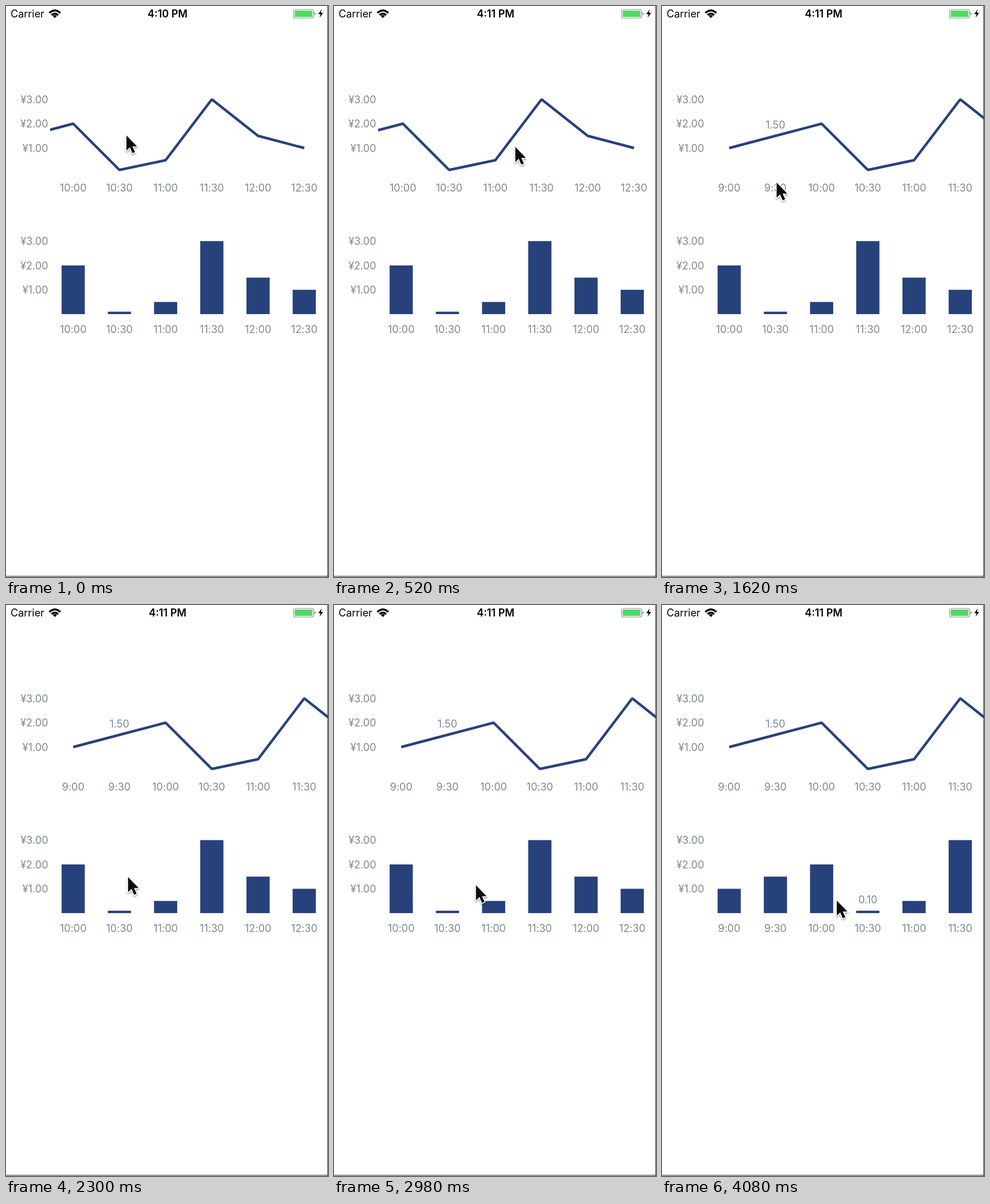
These frames come from a looping animation (562 by 997 pixels, 4.1 s). An HTML page:

```html
<!DOCTYPE html>
<html lang="en">
<head>
<meta charset="utf-8">
<title>Scrolling charts</title>
<style>
  html, body { margin: 0; width: 100%; height: 100%; overflow: hidden; background: #fff; }
  svg { display: block; width: 562px; height: 997px; }
  text { font: 18px Inter, Roboto, sans-serif; }
  .chart text { fill: #7b8991; font-feature-settings: "calt" 0; text-anchor: middle; }
  .chart .axis { text-anchor: end; }
  .line { fill: none; stroke: #27417b; stroke-width: 4.5; stroke-linejoin: bevel; }
  .bar { fill: #27417b; }
  .clock { font-weight: 600; text-anchor: middle; }
</style>
</head>
<body>
<svg viewBox="0 0 562 997">
  <defs>
    <clipPath id="plot"><rect x="77" y="0" width="485" height="997"/></clipPath>
    <filter id="shadow" x="-50%" y="-50%" width="200%" height="200%">
      <feDropShadow dx="0" dy="2" stdDeviation="1.6" flood-opacity=".4"/>
    </filter>
  </defs>

  <text x="8" y="20">Carrier</text>
  <g fill="none" stroke="#000" stroke-width="3.4">
    <path d="M75.8 12.2Q85.3 3.2 94.8 12.2"/>
    <path d="M79.6 16Q85.3 10.8 91 16"/>
  </g>
  <path d="M85.3 21L81.8 17.4Q85.3 14.6 88.8 17.4Z"/>
  <text id="clock" class="clock" x="282" y="20"></text>
  <rect x="502" y="6" width="34.5" height="15" rx="3" fill="#fff" stroke="#8b8b8b" stroke-width="1.2"/>
  <rect x="504" y="8" width="30.5" height="11" rx="1.5" fill="#4cd964"/>
  <path d="M538 11q2.4 .4 2.4 2.5t-2.4 2.5z" fill="#8b8b8b"/>
  <path d="M551 6L545 14.3H549L547.4 20.5L553.6 12H549.6Z"/>

  <g id="charts"></g>

  <path d="M561.5 0V997M0 995.7H562" stroke="#4c4a50" stroke-width="1.2"/>
  <g id="cursor" filter="url(#shadow)">
    <path d="M0 0V26.5L6 20.8L10.5 31L15 29L10.5 19.2H18.6Z" fill="#111"
      stroke="#fff" stroke-width="3" stroke-linejoin="round" paint-order="stroke"/>
  </g>
</svg>
<script>
const LOOP = 4100;
const STEP = 80.65, FIRST = 117.3, UNIT = 42.5, BAR = 40.5;
const SCROLL = 2 * STEP;
const values = [1, 1.5, 2, 0.1, 0.5, 3, 1.5, 1];
const $ = id => document.getElementById(id);

function add(parent, tag, attrs, text = '') {
  const el = document.createElementNS('http://www.w3.org/2000/svg', tag);
  for (const key in attrs) el.setAttribute(key, attrs[key]);
  el.textContent = text;
  return parent.appendChild(el);
}

const pointX = i => FIRST + i * STEP;
const hour = i => `${9 + (i >> 1)}:${i % 2 ? '30' : '00'}`;

// Builds one chart and returns its scrolling layer and value tip.
function chart(base, isLine, tipIndex) {
  const group = add($('charts'), 'g', { class: 'chart' });
  for (let v = 1; v <= 3; v++) {
    add(group, 'text', { class: 'axis', x: 73.5, y: base - v * UNIT + 6.5 }, `¥${v}.00`);
  }
  const plot = add(group, 'g', { 'clip-path': 'url(#plot)' });
  const layer = add(plot, 'g', {});
  const top = i => base - values[i] * UNIT;
  if (isLine) {
    const points = values.map((v, i) => `${pointX(i)},${top(i)}`).join(' ');
    add(layer, 'polyline', { class: 'line', points });
  }
  values.forEach((v, i) => {
    if (!isLine) {
      add(layer, 'rect', {
        class: 'bar', x: pointX(i) - BAR / 2, y: top(i), width: BAR, height: v * UNIT
      });
    }
    add(layer, 'text', { x: pointX(i), y: base + 33 }, hour(i));
  });
  const tip = add(layer, 'text', { x: pointX(tipIndex), y: top(tipIndex) - 13 },
    values[tipIndex].toFixed(2));
  return { layer, tip };
}

const lineChart = chart(290.5, true, 1);
const barChart = chart(538, false, 3);

// Pointer stops: time, x, y
const stops = [
  [0, 210, 226], [520, 316, 246], [740, 404, 252], [900, 398, 256], [1420, 200, 308],
  [1620, 200, 308], [2140, 209, 464], [2300, 213, 475], [2700, 222, 482],
  [2980, 247, 489], [3160, 385, 524], [3240, 385, 530], [3380, 366, 563],
  [3880, 366, 563], [4080, 305, 516], [LOOP, 305, 516]
];

const clamp = p => Math.min(1, Math.max(0, p));
const smooth = p => p * p * (3 - 2 * p);
const progress = (t, from, to) => smooth(clamp((t - from) / (to - from)));

function pointer(t) {
  const k = stops.findIndex(s => s[0] > t);
  const [t0, x0, y0] = stops[k - 1], [t1, x1, y1] = stops[k];
  const p = (t - t0) / (t1 - t0);
  return [x0 + (x1 - x0) * p, y0 + (y1 - y0) * p];
}

function update({ layer, tip }, scroll, tipShown) {
  layer.setAttribute('transform', `translate(${(scroll - 1) * SCROLL} 0)`);
  tip.setAttribute('visibility', tipShown ? 'visible' : 'hidden');
}

function draw(t) {
  $('clock').textContent = t < 260 ? '4:10 PM' : '4:11 PM';
  update(lineChart, progress(t, 500, 760), t >= 1620);
  update(barChart, progress(t, 2980, 3200), t >= 3540);
  $('cursor').setAttribute('transform', `translate(${pointer(t)})`);
}

const start = performance.now();
function tick() {
  draw((performance.now() - start) % LOOP);
  requestAnimationFrame(tick);
}
tick();
</script>
</body>
</html>
```
